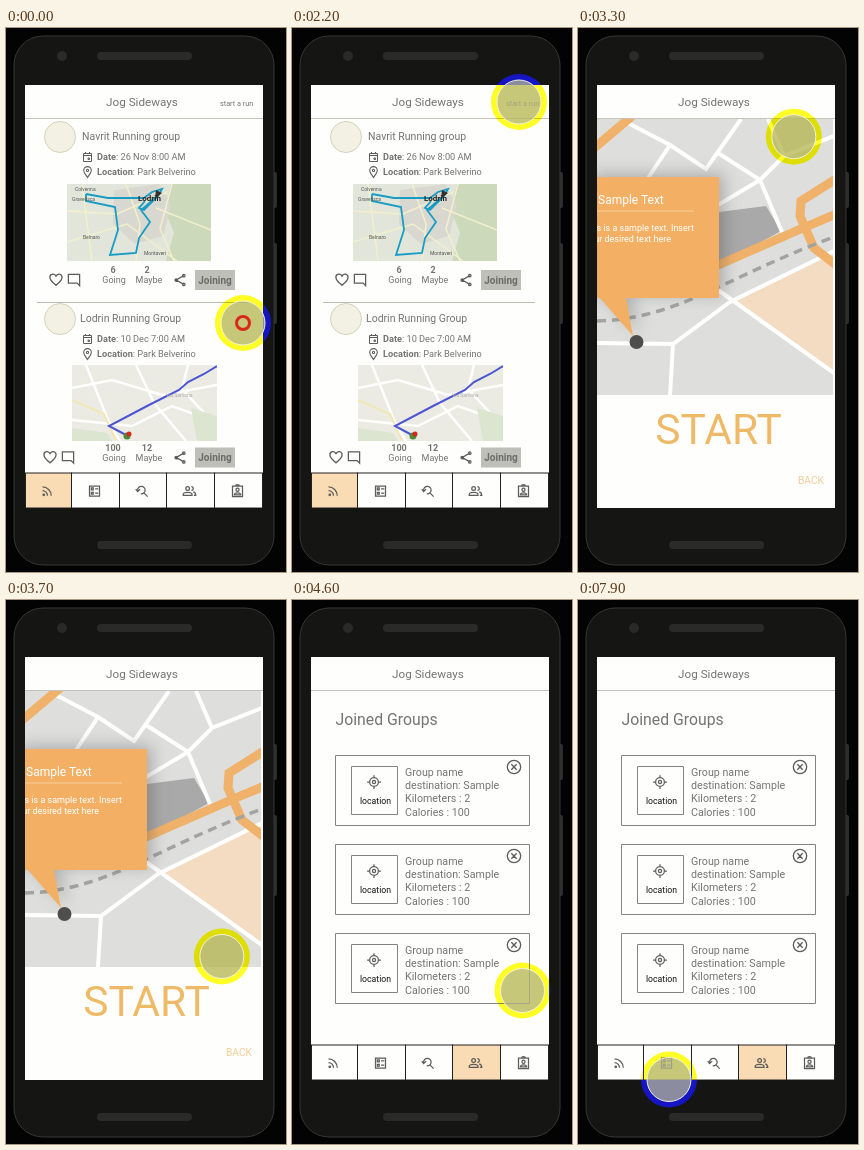
Recreate the animation shown at these times as an HTML page. Size 280 by 544 pixels, loop 8 s.

```html
<!DOCTYPE html>
<html lang="en">
<head>
<meta charset="utf-8">
<title>Running app prototype</title>
<style>
  html, body { margin: 0; width: 100%; height: 100%; overflow: hidden; background: #030303; }
  svg { display: block; width: 280px; height: 544px; font-family: Roboto, sans-serif; isolation: isolate; }
  text { fill: #747470; }
  .b { font-weight: 700; }
  .icon { fill: none; stroke: #5c5c58; stroke-width: 2; }
  .line { fill: none; stroke: #84847e; }
  .road { fill: none; stroke: #fff; stroke-width: 4; }
  .orange { fill: none; stroke: #f0b26a; stroke-width: 9; }
  .tiny { font-size: 5px; fill: #555; }
  #halo { mix-blend-mode: difference; fill: #0000d8; }
  #hints { fill: #2e9dfb; }
</style>
</head>
<body>
<svg viewBox="0 0 280 544">
  <defs>
    <clipPath id="screen"><rect x="19" y="57" width="238" height="423"/></clipPath>
    <clipPath id="cityMap"><rect x="61" y="156" width="144" height="77"/></clipPath>
    <clipPath id="roadMap"><rect x="66" y="337" width="145" height="76"/></clipPath>
    <clipPath id="runMap"><rect x="19" y="91" width="236" height="276"/></clipPath>
  </defs>

  <rect width="280" height="544" fill="#030303"/>
  <g fill="#2c2c2a">
    <rect x="266" y="144" width="5" height="36" rx="2"/>
    <rect x="266" y="215" width="5" height="81" rx="2"/>
  </g>
  <rect x="8" y="8" width="260" height="529" rx="29" fill="#151514" stroke="#363634"/>
  <g fill="#2a2a28">
    <rect x="91" y="24" width="95" height="8" rx="4"/>
    <rect x="91" y="513" width="95" height="8" rx="4"/>
    <circle cx="56" cy="28" r="5"/>
  </g>

  <g clip-path="url(#screen)">
    <rect x="19" y="57" width="238" height="423" fill="#fefefc"/>
    <path d="M19 90.500h238" stroke="#c4c4bc"/>
    <text x="136" y="78" font-size="11.700" text-anchor="middle">Jog Sideways</text>
    <g id="feed"></g>
    <g id="run"></g>
    <g id="joined"></g>
    <g id="hints">
      <rect x="207" y="65" width="49" height="22"/>
      <rect x="80" y="449" width="20" height="28"/>
      <rect x="176" y="449" width="20" height="28"/>
    </g>
  </g>

  <g id="cursor">
    <circle id="halo" r="28"/>
    <circle r="22" fill="rgb(180,180,150)" fill-opacity=".75" stroke="#f2f2dc"/>
    <circle id="press" r="6.500" fill="none" stroke="#d8281c" stroke-width="3"/>
  </g>
</svg>

<script>
const $ = id => document.getElementById(id);
const ring = (x, y, r) => `M${x - r} ${y}a${r} ${r} 0 1 0 ${2 * r} 0a${r} ${r} 0 1 0 ${-2 * r} 0`;

// Icons live on a 24 unit grid.
const icons = {
  rss: 'M4 5.500a14 14 0 0 1 14 14M4 11.500a8 8 0 0 1 8 8' + ring(6, 18, 1.2),
  ballot: 'M4 4h16v16H4zM7 7h3v3H7zM7 14h3v3H7zM13 8.500h5M13 15.500h5',
  search: 'M5 11a6 6 0 1 1 5 5.500M15 15l6 6M2 9l3 4 4-4',
  people: ring(9, 8, 3) + 'M2 19v-2c0-4 14-4 14 0v2zM15 5a3 3 0 0 1 0 6M18 13.500c3 1 4 2 4 5.500h-3',
  portrait: 'M4 4h16v17H4zM9 4c0-3 6-3 6 0M7 18c0-4 10-4 10 0z' + ring(12, 10, 2.5),
  heart: 'M12 20C5 14 3 12 3 8.500a4.500 4.500 0 0 1 9-1.500a4.500 4.500 0 0 1 9 1.500c0 3.500-2 5.500-9 11.500z',
  chat: 'M3 3h18v18l-4-4H3z',
  share: 'M18 5L6 12L18 19' + ring(18, 5, 2) + ring(6, 12, 2) + ring(18, 19, 2),
  calendar: 'M4 5h16v16H4zM4 9h16M8 2v4M16 2v4M13 14h3v3h-3z',
  pin: 'M12 22C8 16 5 13 5 9a7 7 0 0 1 14 0c0 4-3 7-7 13z' + ring(12, 9, 2),
  target: ring(12, 12, 7) + ring(12, 12, 2.5) + 'M12 1v4M12 19v4M1 12h4M19 12h4',
  close: ring(12, 12, 10) + 'M8 8l8 8M16 8l-8 8'
};

const icon = (name, x, y, size) =>
  `<path class="icon" d="${icons[name]}" transform="translate(${x - size / 2} ${y - size / 2}) scale(${size / 24})"/>`;
const text = (x, y, size, content, attrs = '') =>
  `<text x="${x}" y="${y}" font-size="${size}" ${attrs}>${content}</text>`;
const middle = 'text-anchor="middle"';

function navBar(active) {
  const edges = [19, 65, 113, 160, 208, 256];
  const names = ['rss', 'ballot', 'search', 'people', 'portrait'];
  return names.map((name, i) => {
    const x = edges[i], width = edges[i + 1] - x;
    return `<rect x="${x + .5}" y="445" width="${width}" height="35" fill="${i === active ? '#fadcb4' : '#fefefc'}" stroke="#222"/>`
      + icon(name, x + width / 2 - .5, 463, 15);
  }).join('');
}

function post({ y, x, name, date, going, maybe, actionX, actionY }) {
  const label = (bold, rest) => `<tspan class="b">${bold}</tspan>: ${rest}`;
  return `<circle cx="54" cy="${y}" r="15.500" fill="#f3f1e4" stroke="#d6d2ba"/>`
    + text(x, y + 3, 10.5, name)
    + icon('calendar', 81.5, y + 20, 12) + text(91, y + 23, 9.2, label('Date', date))
    + icon('pin', 81.5, y + 35, 13) + text(91, y + 38, 9.2, label('Location', 'Park Belverino'))
    + icon('heart', actionX, actionY, 16) + icon('chat', actionX + 18, actionY, 15)
    + text(107, actionY - 7, 9, going, middle + ' class="b"') + text(108, actionY + 3, 9, 'Going', middle)
    + text(141, actionY - 7, 9, maybe, middle + ' class="b"') + text(143, actionY + 3, 9, 'Maybe', middle)
    + icon('share', 174, actionY, 15)
    + `<rect x="189" y="${actionY - 10}" width="40" height="20" fill="#bfbfba"/>`
    + text(209, actionY + 3.5, 10, 'Joining', middle + ' class="b" style="fill:#6c6c68"');
}

const cityMap = `<g clip-path="url(#cityMap)">
  <rect x="61" y="156" width="144" height="77" fill="#e2e6da"/>
  <path d="M165 156h40v77h-45l8-28-10-25z" fill="#ccd9ba"/>
  <path d="M108 162l45-6 12 22-8 30-28 8-22-20z" fill="#d9d8d0"/>
  <path d="M61 183l50 3 50-22M76 156l10 77M61 214l60-18 50 37M120 156l14 40-4 37M150 180l55 22M166 156l-12 45 14 32" fill="none" stroke="#f2efcc" stroke-width="1.500"/>
  <path d="M80 166l22 4 36 0 8-6 10-3-4 7-14 14-5-2 6-7M80 166v7l29 6 3 23-8 25 26-2 3-15 11-16-9-12 5-4 10-9" fill="none" stroke="#189cc4" stroke-width="1.800"/>
  <path d="M150 162l6 3-7 6z" fill="#333"/>
  <text class="tiny" x="69" y="163">Colvenna</text>
  <text class="tiny" x="66" y="173">Gravelisca</text>
  <text class="tiny" x="77" y="211">Belnaro</text>
  <text class="tiny" x="138" y="227">Montaveri</text>
  <text x="132" y="173" font-size="8" class="b" style="fill:#222">Lodrin</text></g>`;

const roadMap = `<g clip-path="url(#roadMap)">
  <rect x="66" y="337" width="145" height="76" fill="#ebebe4"/>
  <path d="M66 360l40-8 50 15 55-10M80 337l24 60 10 16M66 392l60 6 40-20 45 16M130 337l18 38 32 38M182 337l-6 24 35 38" fill="none" stroke="#fff" stroke-width="2.500"/>
  <path d="M66 400l35 5 5 8H66zM185 380l26 8v25h-20z" fill="#dbe5cf"/>
  <path d="M66 372l32 14 12 27" fill="none" stroke="#f2e7b4" stroke-width="2"/>
  <path d="M211 338l-13 8-16 8-9 8-30 15-40 21 17 9" fill="none" stroke="#4c55d2" stroke-width="2"/>
  <circle cx="121" cy="408" r="3.500" fill="#4c8b38"/><circle cx="123" cy="406" r="2.500" fill="#d8281c"/>
  <text class="tiny" x="160" y="369" style="fill:#aaa">Via Sarvona</text></g>`;

$('feed').innerHTML = text(214, 77.5, 7.3, 'start a run')
  + post({ y: 109, x: 76, name: 'Navrit Running group', date: '26 Nov 8:00 AM', going: 6, maybe: 2, actionX: 50, actionY: 252 })
  + cityMap + '<path d="M31 274.500h212" stroke="#bdbdb4"/>'
  + post({ y: 291, x: 74, name: 'Lodrin Running Group', date: '10 Dec 7:00 AM', going: 100, maybe: 12, actionX: 44, actionY: 429.5 })
  + roadMap + navBar(0);

$('run').innerHTML = `<g clip-path="url(#runMap)">
  <rect x="19" y="91" width="236" height="276" fill="#dededc"/>
  <path d="M141 184l47-6 15 25-62 34z" fill="#a9a9aa"/>
  <path d="M155 274l101-50v120z" fill="#f3dcc2"/>
  <path class="road" d="M50 95L92 117L70 150M92 117L128 141L163 91M140 125L182 152L206 128L256 108M182 152L140 177M182 152L204 204M19 315L95 316L152 274L256 223M95 316L92 367M140 262L256 345M206 128L190 91"/>
  <path class="orange" d="M15 121L54 88M138 238L225 200L258 186M258 151L223 173L222 188L236 220L258 237"/>
  <path d="M19 293C100 291 145 250 256 209" fill="none" stroke="#a3a3a0" stroke-width="3.500" stroke-dasharray="9 6"/>
  <path d="M10 149H141V270H48L55 308L22 270H10z" fill="#f3b064" style="filter:drop-shadow(5px -3px 8px #4445)"/>
  <path d="M19 183h97" stroke="#f8cf9e"/>
  <circle cx="58.500" cy="314" r="7" fill="#4e4e4c"/>`
  + text(20, 176, 12, 'Sample Text', 'style="fill:#fff"')
  + text(116, 203, 9, 'This is a sample text. Insert', 'text-anchor="end" style="fill:#fff"')
  + text(93, 214, 9, 'your desired text here', 'text-anchor="end" style="fill:#fff"') + '</g>'
  + text(140.5, 416, 42.5, 'START', middle + ' style="fill:#efba68"')
  + text(220, 456, 10.2, 'BACK', 'style="fill:#f1cd96"');

const card = y => `<path class="line" d="M43.500 ${y}.500h194v70h-194zM59.500 ${y + 11}.500h46v48h-46z"/>`
  + icon('target', 82, y + 27, 15) + icon('close', 222, y + 12, 16)
  + text(68, y + 49, 8.7, 'location', 'style="fill:#111"')
  + ['Group name', 'destination: Sample', 'Kilometers : 2', 'Calories : 100']
    .map((line, i) => text(113, y + 21 + i * 13.2, 10.7, line)).join('');

$('joined').innerHTML = text(43.5, 125, 15.8, 'Joined Groups')
  + [155, 244, 333].map(card).join('') + navBar(3);

const LOOP = 8000, WIDTH = 238, PUSH = 450;
const progress = (t, start, end) => Math.min(1, Math.max(0, (t - start) / (end - start)));
const smooth = u => u * u * (3 - 2 * u);
const easeOut = u => u * (2 - u);

// Cursor moves along quadratic curves: start, control, end.
const moves = [
  { start: 1400, end: 2150, path: [[237, 295], [192, 185], [227, 74]] },
  { start: 3170, end: 3850, path: [[227, 74], [163, 255], [230.5, 390.5]] },
  { start: 7000, end: 7800, path: [[230.5, 390.5], [155, 422], [91, 479.5]] }
];
const presses = [[0, 100], [2240, 2320], [3970, 4060]];

function cursorAt(t) {
  const { start, end, path: [a, b, c] } = moves.findLast(m => t >= m.start) || moves[0];
  const u = smooth(progress(t, start, end)), v = 1 - u;
  return a.map((p, i) => v * v * p + 2 * u * v * b[i] + u * u * c[i]);
}

const place = (id, x, y = 0) => $(id).setAttribute('transform', `translate(${x} ${y})`);
const fade = (id, opacity) => $(id).setAttribute('opacity', opacity);

function draw(t) {
  const push = start => easeOut(progress(t, start, start + PUSH));
  const scroll = WIDTH * (push(2330) + push(4072));
  ['feed', 'run', 'joined'].forEach((id, i) => place(id, i * WIDTH - scroll));

  place('cursor', ...cursorAt(t));
  fade('press', presses.some(([from, to]) => t >= from && t < to) ? 1 : 0);
  // A press outside the tappable areas makes them flash.
  fade('hints', .3 * progress(t, 80, 250) * (1 - progress(t, 600, 1100)));
}

const origin = performance.now();
function tick() {
  draw((performance.now() - origin) % LOOP);
  requestAnimationFrame(tick);
}
tick();
</script>
</body>
</html>
```
